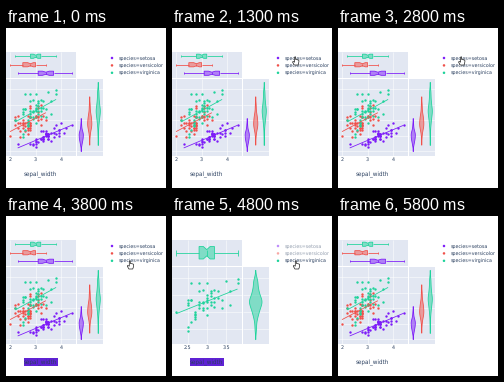
A matplotlib script that plays this animation: 160 px wide and 160 px high, repeating every 6200 ms.

```python
import numpy as np
import matplotlib.pyplot as plt
from matplotlib.animation import FuncAnimation
from matplotlib.patches import Circle, Polygon, Rectangle

SIZE, STEP, LOOP = 160, 100, 6200
PANEL, INK = "#e2e7f2", "#2a3f5f"
LEFT, RIGHT, TOP, BOTTOM = 4.0, 65.5, 50.5, 127.5   # data x span, main panel y span
BOX_TOP, BOX_H = 24.0, 25.5                         # upper marginal
VIO_LEFT, VIO_W = 71.0, 25.5                        # right marginal
FILL = 0.49                                         # share of a slot used by a shape

# x: five-number summary; y: mean, sd, bandwidth, min, max; fit: intercept, slope
SPECIES = [
    dict(name="setosa", color="#7d1cf8", box=(2.3, 3.1, 3.4, 3.7, 4.4),
         x=(3.428, 0.379), y=(5.006, 0.352, 0.155, 4.3, 5.8), r=0.74, fit=(2.639, 0.690),
         known=[(2.3, 4.5), (4.4, 5.7), (4.2, 5.5), (4.1, 5.2), (4.0, 5.8), (3.0, 4.3),
                (2.9, 4.4), (3.8, 5.7), (3.9, 5.4), (3.5, 5.1)]),
    dict(name="versicolor", color="#f0504a", box=(2.0, 2.5, 2.8, 3.0, 3.4),
         x=(2.770, 0.314), y=(5.936, 0.516, 0.250, 4.9, 7.0), r=0.53, fit=(3.540, 0.865),
         known=[(2.0, 5.0), (3.4, 6.0), (2.2, 6.0), (2.2, 6.2), (3.2, 7.0), (2.3, 5.5),
                (2.4, 4.9), (2.3, 6.3), (3.1, 6.9), (3.3, 6.3), (2.8, 6.8)]),
    dict(name="virginica", color="#1fd39b", box=(2.2, 2.8, 3.0, 3.2, 3.8),
         x=(2.974, 0.322), y=(6.588, 0.636, 0.260, 4.9, 7.9), r=0.46, fit=(3.907, 0.901),
         known=[(3.8, 7.9), (3.8, 7.7), (2.2, 6.0), (2.6, 7.7), (2.5, 4.9), (2.8, 7.7),
                (3.0, 7.7), (3.6, 7.2), (2.9, 7.3), (3.4, 6.2), (2.7, 5.8), (2.5, 6.7)]),
]

rng = np.random.default_rng(7)


def sample(s, n=50):
    """Fill up the known points with correlated draws on a 0.1 grid."""
    pts = list(s["known"])
    (mx, sx), (my, sy, _, lo, hi) = s["x"], s["y"]
    while len(pts) < n:
        a, b = rng.normal(size=2)
        x = round(mx + 0.9 * sx * a, 1)
        y = round(my + 0.9 * sy * (s["r"] * a + np.sqrt(1 - s["r"] ** 2) * b), 1)
        if s["box"][0] < x < s["box"][-1] and lo < y < hi:
            pts.append((x, y))
    return np.array(pts)


for s in SPECIES:
    s["pts"] = sample(s)

plt.rcParams["font.family"] = "DejaVu Sans"
plt.rcParams["text.hinting"] = "none"
fig = plt.figure(figsize=(1.6, 1.6), dpi=100, facecolor="white")
ax = fig.add_axes([0, 0, 1, 1])
ax.set(xlim=(0, SIZE), ylim=(SIZE, 0))
ax.axis("off")


def px(v):
    """Pixels to points."""
    return v * 72 / fig.dpi


def rect(x, y, w, h, color, z=0):
    return ax.add_patch(Rectangle((x, y), w, h, fc=color, lw=0, zorder=z))


def line(xs, ys, color, w=0.8, z=3):
    return ax.plot(xs, ys, color=color, lw=px(w), zorder=z, solid_capstyle="butt")[0]


def shape(pts, color, z=3):
    return [ax.add_patch(Polygon(pts, fc=color, alpha=0.5, lw=0, zorder=z)),
            ax.add_patch(Polygon(pts, fc="none", ec=color, lw=px(0.8), zorder=z))]


def label(x, y, text, size=4.7, ha="left", z=4):
    return ax.text(x, y, text, fontsize=px(size), color=INK, ha=ha,
                   va="baseline", zorder=z)


def box_plot(s, fx, cy, h):
    lo, q1, mid, q3, hi = s["box"]
    notch = 1.57 * (q3 - q1) / np.sqrt(50)
    top = [(q1, 1), (mid - notch, 1), (mid, 0.5), (mid + notch, 1), (q3, 1)]
    pts = [(fx(x), cy - k * h / 2) for x, k in top]
    pts += [(fx(x), cy + k * h / 2) for x, k in reversed(top)]
    c = s["color"]
    out = shape(pts, c)
    out.append(line([fx(mid)] * 2, [cy - h / 4, cy + h / 4], c))
    for a, b in ((lo, q1), (hi, q3)):
        out.append(line([fx(a), fx(b)], [cy, cy], c))
        out.append(line([fx(a)] * 2, [cy - h / 4, cy + h / 4], c))
    return out


def violin(s, fy, cx, w):
    bw, lo, hi = s["y"][2:]
    ys = np.linspace(lo - 2 * bw, hi + 2 * bw, 60)
    dens = np.exp(-0.5 * ((ys[:, None] - s["pts"][:, 1]) / bw) ** 2).sum(axis=1)
    half = dens / dens.max() * w / 2
    xs = np.r_[cx - half, (cx + half)[::-1]]
    return shape(np.c_[xs, fy(np.r_[ys, ys[::-1]])], s["color"])


def build_view(shown, tick):
    """All artists for one set of visible species."""
    x0 = min(s["box"][0] for s in shown)
    x1 = max(s["box"][-1] for s in shown)
    lo = min(s["y"][3] - 2 * s["y"][2] for s in shown)
    hi = max(s["y"][4] + 2 * s["y"][2] for s in shown)
    pad = (hi - lo) / 18

    def fx(x):
        return LEFT + (x - x0) / (x1 - x0) * (RIGHT - LEFT)

    def fy(y):
        return BOTTOM - (y - lo + pad) / (hi - lo + 2 * pad) * (BOTTOM - TOP)

    out = []
    for v in np.arange(2, 4.6, tick):
        if x0 - 0.01 <= v <= x1 + 0.01:
            for a, b in ((BOX_TOP, BOX_TOP + BOX_H), (TOP, BOTTOM)):
                out.append(line([fx(v)] * 2, [a, b], "white", 0.5, 1))
            out.append(label(fx(v), 133.2, f"{v:g}", ha="center"))
    for v in range(4, 9):
        if TOP < fy(v) < BOTTOM:
            for a, b in ((0, 69.7), (VIO_LEFT, VIO_LEFT + VIO_W)):
                out.append(line([a, b], [fy(v)] * 2, "white", 0.5, 1))

    n = len(shown)
    for i, s in enumerate(shown):
        c = s["color"]
        out.append(ax.scatter(fx(s["pts"][:, 0]), fy(s["pts"][:, 1]),
                              s=px(2.4) ** 2, color=c, lw=0, zorder=2))
        ends = np.array([s["box"][0], s["box"][-1]])
        out.append(line(fx(ends), fy(s["fit"][0] + s["fit"][1] * ends), c))
        out += box_plot(s, fx, BOX_TOP + BOX_H * (n - i - 0.5) / n, BOX_H / n * FILL)
        out += violin(s, fy, VIO_LEFT + VIO_W * (i + 0.5) / n, VIO_W / n * FILL)
    return out


rect(0, BOX_TOP, 69.7, BOX_H, PANEL)
rect(0, TOP, 69.7, BOTTOM - TOP, PANEL)
rect(VIO_LEFT, TOP, VIO_W, BOTTOM - TOP, PANEL)

VIEWS = [build_view(SPECIES, 1), build_view(SPECIES[1:], 0.5), build_view(SPECIES[2:], 0.5)]

legend = []
for i, s in enumerate(SPECIES):
    y = 30 + 7.4 * i
    dot = ax.add_patch(Circle((106, y), 1.25, fc=s["color"], lw=0, zorder=4))
    legend.append((dot, label(113, y + 1.6, "species=" + s["name"])))

highlight = rect(17.5, 142, 34.5, 8, "#5f22d4", 3)
label(34.8, 148, "sepal_width", 5.6, "center")

HAND = np.array([(-1.2, -4), (-0.2, -4), (-0.2, -1.6), (2.6, -1), (3.2, -0.2), (2.8, 2.4),
                 (2.2, 4), (-1.6, 4), (-3.2, 1.2), (-2.8, 0.4), (-1.2, 1.2)])
ARROW = np.array([(-2, -4), (-2, 3), (-0.4, 1.6), (0.7, 4), (1.7, 3.5), (0.7, 1.2), (2.8, 1)])
cursor = ax.add_patch(Polygon(HAND, fc="white", ec="#222222", lw=px(0.7), zorder=6))

# cursor stops: time, x, y
PATH = np.array([(500, 138, -6), (900, 130, 39), (1000, 130, 39), (1300, 123.8, 33),
                 (3000, 123.8, 33), (3500, 124.5, 49), (5300, 124.5, 49), (5800, 124, -6)])


def ease(u):
    return u * u * (3 - 2 * u)


def cursor_at(t):
    if t <= PATH[0, 0] or t >= PATH[-1, 0]:
        return PATH[0, 1:]
    k = np.searchsorted(PATH[:, 0], t, side="right") - 1
    a, b = PATH[k], PATH[k + 1]
    return a[1:] + (b - a)[1:] * ease((t - a[0]) / (b[0] - a[0]))


def update(i):
    t = i * STEP
    view = 1 if 1800 <= t < 2800 else 2 if 3900 <= t < 5000 else 0
    for k, artists in enumerate(VIEWS):
        for a in artists:
            a.set_visible(k == view)
    for k, entry in enumerate(legend):
        for a in entry:
            a.set_alpha(0.5 if k < view else 1)
    highlight.set_visible(t == 3800 or 4800 <= t < 5000)
    pos = cursor_at(t)
    cursor.set_xy((HAND if pos[1] > 26 else ARROW) + pos)
    return []


anim = FuncAnimation(fig, update, frames=LOOP // STEP, interval=STEP,
                     init_func=lambda: [], repeat=True, repeat_delay=0, blit=False)
plt.show()
```
